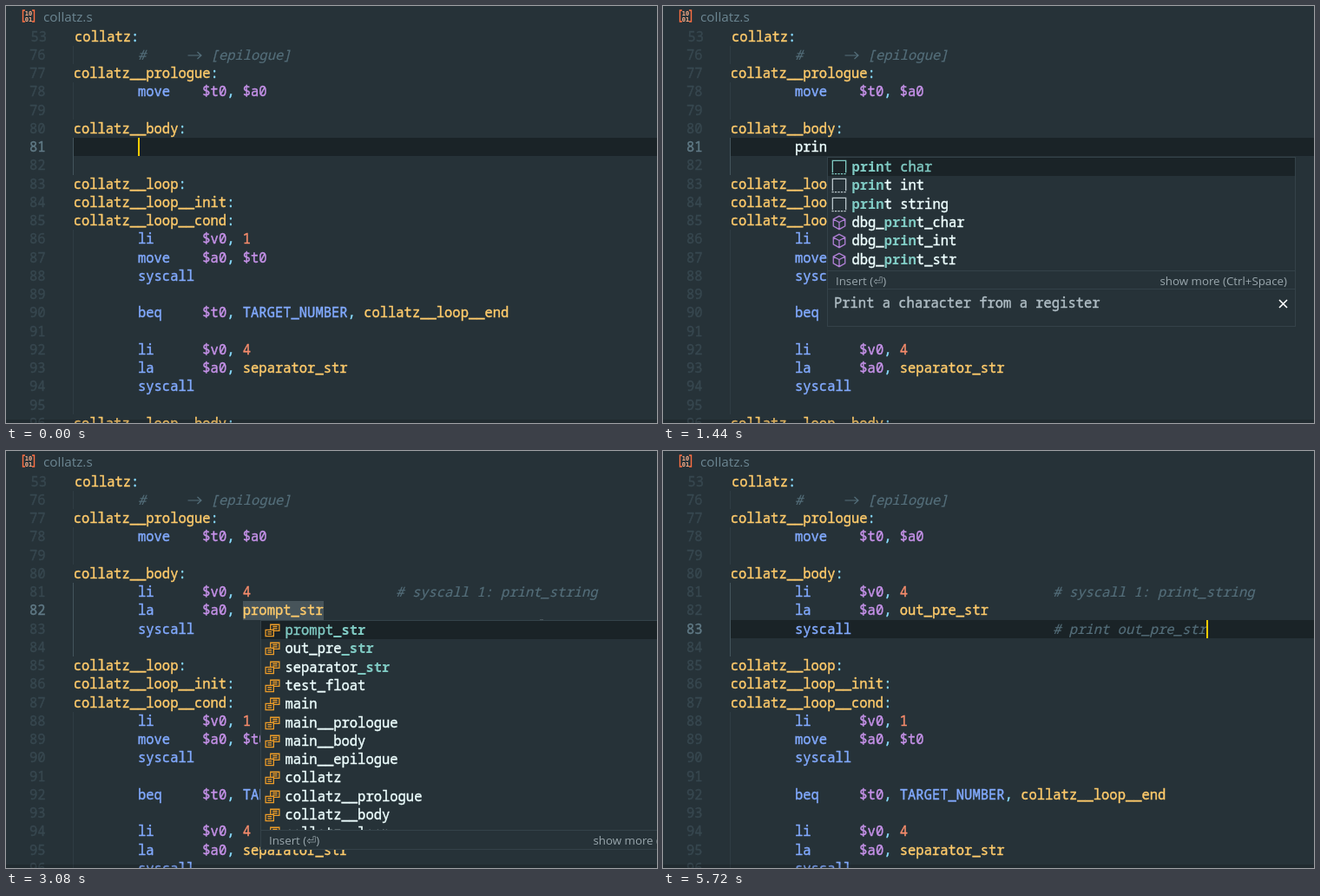
These frames come from a looping animation (750 by 481 pixels, 6080 ms). An HTML page:

```html
<!DOCTYPE html>
<html lang="en">
<head>
<meta charset="utf-8">
<title>Snippet completion</title>
<style>
  html, body { margin: 0; width: 100%; height: 100%; overflow: hidden; background: #263238; }
  #stage { position: relative; width: 750px; height: 481px; overflow: hidden; background: #263238; }
  #stage div { position: absolute; box-sizing: border-box; white-space: pre; }
  #view { inset: 0; }
  svg { fill: none; stroke: currentColor; }

  /* The thin stroke gives the regular face a medium weight. */
  .mono, .code, .num {
    font: 400 15.49px/21px "Noto Sans Mono", "DejaVu Sans Mono", monospace;
    font-variant-ligatures: none;
    -webkit-text-stroke: .4px currentColor;
  }
  .ui { font-family: "Open Sans", "Noto Sans", sans-serif; color: #9aa7ad; }
  .code { color: #89ddff; }
  .num { color: #37474f; }
  .num.on { color: #607a86; }
  .name { color: #ffcb6b; }
  .op { color: #82aaff; }
  .reg { color: #c792ea; }
  .int { color: #f78c6c; }
  .note { color: #546e7a; font-style: italic; -webkit-text-stroke-width: .2px; }
  .fresh { color: #eeffff; }
  .arrow { width: 18.6px; height: 12px; vertical-align: -1px; }

  .line { left: 77px; width: 673px; height: 21px; background: #1a2327; }
  .guide { left: 77px; width: 1px; background: #2f3c43; }
  .guide.on { background: #43545c; }
  .mark { background: #47545a; }
  .caret { width: 2px; height: 21px; background: #ffcc00; }

  .popup { width: 540px; background: #263238; border: 1px solid #344249; }
  .list { left: 0; top: 0; width: 538px; overflow: hidden; }
  .item { left: 0; width: 538px; height: 21.3px; color: #eeffff; }
  .item.on { background: #1a2327; color: #80cbc4; }
  .item span { position: absolute; left: 27.5px; }
  .item b { color: #80cbc4; font-weight: 700; -webkit-text-stroke-width: 0; }
  .item svg { position: absolute; left: 4px; top: 2px; width: 18px; height: 18px; color: #b9c5ca; }
  .item.on svg.snip { color: #80cbc4; }
  .item svg.cube { color: #b180d7; }
  .item svg.var { color: #75beff; }
  .item svg.label { color: #ee9d28; }
  .slider { right: 0; top: 0; width: 14px; background: rgba(130, 150, 160, .1); }
  .bar { left: 0; width: 538px; height: 22px; border-top: 1px solid #344249; font-size: 13.3px; line-height: 23px; }
  .bar i { position: absolute; right: 9px; font-style: normal; }
  .info { left: 0; width: 538px; height: 44px; border-top: 1px solid #344249; padding: 5px 7px; color: #b0bec5; }
  .info svg { position: absolute; left: 519px; top: 11px; width: 11px; height: 11px; color: #fff; }

  #file { left: 43px; top: 1px; font-size: 15.3px; line-height: 22px; color: #6c8692; }
  #badge { position: absolute; left: 18px; top: 3px; color: #ff7043; }
  #badge text { fill: #ffb28c; stroke: none; font: 700 7px "DejaVu Sans Mono", monospace; }
  #foot { left: 0; top: 477px; width: 750px; height: 4px; background: rgba(0, 0, 0, .14); }
</style>
</head>
<body>
<div id="stage">
  <svg id="badge" width="16" height="17" stroke-width="1.4">
    <path d="M4 2H1.5V15H4M12 2H14.5V15H12"/>
    <text x="3.8" y="8">10</text><text x="3.8" y="14.5">01</text>
  </svg>
  <div id="file" class="ui">collatz.s</div>
  <div id="view"></div>
  <div id="foot"></div>
</div>
<script>
const LOOP = 6080, X0 = 77.65, CHAR = 9.294, ROW = 21.25, ITEM = 21.3, LIST_MAX = 241;
const colX = c => X0 + c * CHAR;
const rowY = r => Math.round(24.5 + r * ROW);

const asm = (op, args = '', note = '') =>
  (' '.repeat(8) + op.padEnd(8) + args).padEnd(note ? 40 : 0) + note;

const head = ['collatz:', ' '.repeat(8) + '#     -> [epilogue]', 'collatz__prologue:',
  asm('move', '$t0, $a0'), '', 'collatz__body:'];
const tail = ['', 'collatz__loop:', 'collatz__loop__init:', 'collatz__loop__cond:',
  asm('li', '$v0, 1'), asm('move', '$a0, $t0'), asm('syscall'), '',
  asm('beq', '$t0, TARGET_NUMBER, collatz__loop__end'), '',
  asm('li', '$v0, 4'), asm('la', '$a0, separator_str'), asm('syscall'), '',
  'collatz__loop__body:'];
const typed = word => [word && asm(word)];
const snippet = name => [
  asm('li', '$v0, 4', '# syscall 1: print_string'),
  asm('la', '$a0, ' + name),
  asm('syscall', '', '# print ' + name)];

const words = ['snip print char', 'snip print int', 'snip print string', 'cube pop', 'cube push',
  'var prompt_str', 'cube dbg_print_char', 'cube dbg_print_int', 'cube dbg_print_str',
  'var out_pre_str', 'var main__prologue', 'var collatz__prologue'];
const labels = ['prompt_str', 'out_pre_str', 'separator_str', 'test_float', 'main', 'main__prologue',
  'main__body', 'main__epilogue', 'collatz', 'collatz__prologue', 'collatz__body', 'collatz__loop']
  .map(s => 'label ' + s);
const infos = ['Print a character from a register', 'Print an integer from a register',
  'Print a string from an address'];

const wordPopup = (query, sel = 0) => ({
  x: Math.floor(colX(8 + query.length)), y: 174, query, sel, info: infos[sel],
  items: words.filter(w => w.slice(w.indexOf(' ')).includes(query))
});
const labelPopup = sel => ({ x: 293, y: 195, query: '_str', sel, items: labels });

// Each step overrides part of the state before it.
const steps = [
  [0, { body: typed(''), row: 6, col: 8, caret: true, fresh: '', popup: null, mark: false }],
  [280, { caret: false }],
  [600, { body: typed('p'), fresh: 'p', col: 9, caret: true }],
  [680, { popup: wordPopup('p') }],
  [720, { body: typed('pr'), fresh: 'pr', col: 10, popup: wordPopup('pr') }],
  [800, { body: typed('pri'), fresh: 'pri', col: 11, popup: wordPopup('pri') }],
  [880, { body: typed('prin'), fresh: 'prin', col: 12 }],
  [920, { popup: wordPopup('prin') }],
  [1440, { caret: false }],
  [1600, { popup: wordPopup('prin', 1) }],
  [1720, { popup: wordPopup('prin', 2) }],
  [1840, { caret: true }],
  [2440, { caret: false }],
  [2520, { body: snippet('prompt_str'), fresh: 'prompt_str', row: 7, col: 31, caret: true, popup: null, mark: true }],
  [2600, { popup: labelPopup(0) }],
  [2800, { fresh: '' }],
  [3080, { caret: false }],
  [3400, { popup: labelPopup(1) }],
  [3520, { caret: true }],
  [3720, { body: snippet('out_pre_str'), fresh: 'out_pre_str', row: 8, col: 56.7, popup: null, mark: false }],
  [3800, { col: 59 }],
  [4040, { fresh: '' }],
  [4320, { caret: false }],
  [4720, { caret: true }],
  [5320, { caret: false }],
  [5600, { caret: true }]
];
let last = {};
const states = steps.map(([, change]) => last = { ...last, ...change });

const div = (cls, style, inner = '') => `<div class="${cls}" style="${style}">${inner}</div>`;
const at = (x, y) => `left:${x}px;top:${y}px;`;

const shapes = {
  snip: '<path d="M1.2 13.5V1.2H14.8V13.5"/><path d="M.4 14.8H15.6" stroke-dasharray="2 1.1"/>',
  cube: '<path d="M8 1.2L14 4.4V11.4L8 14.8L2 11.4V4.4ZM2 4.4L8 7.6L14 4.4M8 7.6V14.8"/>',
  var: '<path d="M3.2 4H.8V12.4H3.2M12.8 4H15.2V12.4H12.8M4.2 8.2L8.6 5.6L11.8 7V8.8L7.4 11.2L4.2 9.8ZM4.2 8.2L7.4 9.4L11.8 7"/>',
  label: '<path d="M6 7V2H15V8.4H9.5M8.2 4H13M8.2 6.2H13M1 7.4H9.2V13.8H1ZM3 9.5H7.2M3 11.6H7.2"/>'
};
const icon = kind => `<svg class="${kind}" viewBox="0 0 16 16" stroke-width="1.15">${shapes[kind]}</svg>`;
const arrow = '<svg class="arrow" viewBox="0 0 18.6 12"><path d="M1.5 6H17M12.5 2L17 6L12.5 10" stroke-width="1.2"/></svg>';

const token = /(#.*)|(\$\w+)|(\b\d+\b)|(\b(?:li|la|move|syscall|beq|TARGET_NUMBER)\b)|(\w+)/g;
const kinds = ['note', 'reg', 'int', 'op', 'name'];
function paint(text, fresh) {
  return text.replace(token, (s, ...groups) => {
    const kind = kinds[groups.slice(0, 5).findIndex(Boolean)];
    const cls = kind === 'name' && s === fresh ? 'fresh' : kind;
    return `<span class="${cls}">${s.replace('->', arrow)}</span>`;
  });
}

function drawPopup({ x, y, query, sel, info, items }) {
  const full = items.length * ITEM + 2;
  const h = Math.min(Math.round(full), LIST_MAX);
  const rows = items.map((item, i) => {
    const cut = item.indexOf(' ');
    const label = item.slice(cut + 1).replace(query, '<b>$&</b>');
    return div('item mono' + (i === sel ? ' on' : ''), `top:${i * ITEM}px`,
      icon(item.slice(0, cut)) + `<span>${label}</span>`);
  }).join('');
  const slider = full > LIST_MAX ? div('slider', `height:${h * h / full}px`) : '';
  const cross = '<svg viewBox="0 0 11 11" stroke-width="1.6"><path d="M1 1L10 10M10 1L1 10"/></svg>';
  return div('popup', at(x, y) + `height:${h + (info ? 66 : 24)}px`,
    div('list', `height:${h}px`, rows + slider) +
    div('bar ui', `top:${h}px;padding-left:9px`, 'Insert (⏎)<i>show more (Ctrl+Space)</i>') +
    (info ? div('info mono', `top:${h + 21}px`, info + cross) : ''));
}

function draw(s) {
  const lines = [...head, ...s.body, ...tail].slice(0, 22);
  const bodyEnd = head.length + s.body.length;
  let html = s.mark ? '' : div('line', `top:${rowY(s.row)}px`);
  if (s.mark) {
    html += div('mark', at(273, 173) + 'width:93px;height:22px');
    html += div('mark', at(615, 194) + 'width:4px;height:1px');
  }
  lines.forEach((text, r) => {
    const y = rowY(r), nudge = r ? 0 : 1.4;
    if (!/^\w/.test(text)) {
      const active = r >= head.length && r <= bodyEnd;
      html += div('guide' + (active ? ' on' : ''), `top:${y}px;height:${rowY(r + 1) - y}px`);
    }
    html += div('num' + (r === s.row ? ' on' : ''), at(27 + nudge, y), r ? 75 + r : 53);
    html += div('code', at(X0 + nudge, y), paint(text, s.fresh));
  });
  if (s.caret) html += div('caret', at(Math.floor(colX(s.col) + .05), rowY(s.row)));
  if (s.popup) html += drawPopup(s.popup);
  document.getElementById('view').innerHTML = html;
}

let shown = -1;
function tick() {
  const t = performance.now() % LOOP;
  const now = steps.findLastIndex(([start]) => start <= t);
  if (now !== shown) draw(states[shown = now]);
  requestAnimationFrame(tick);
}
tick();
</script>
</body>
</html>
```
